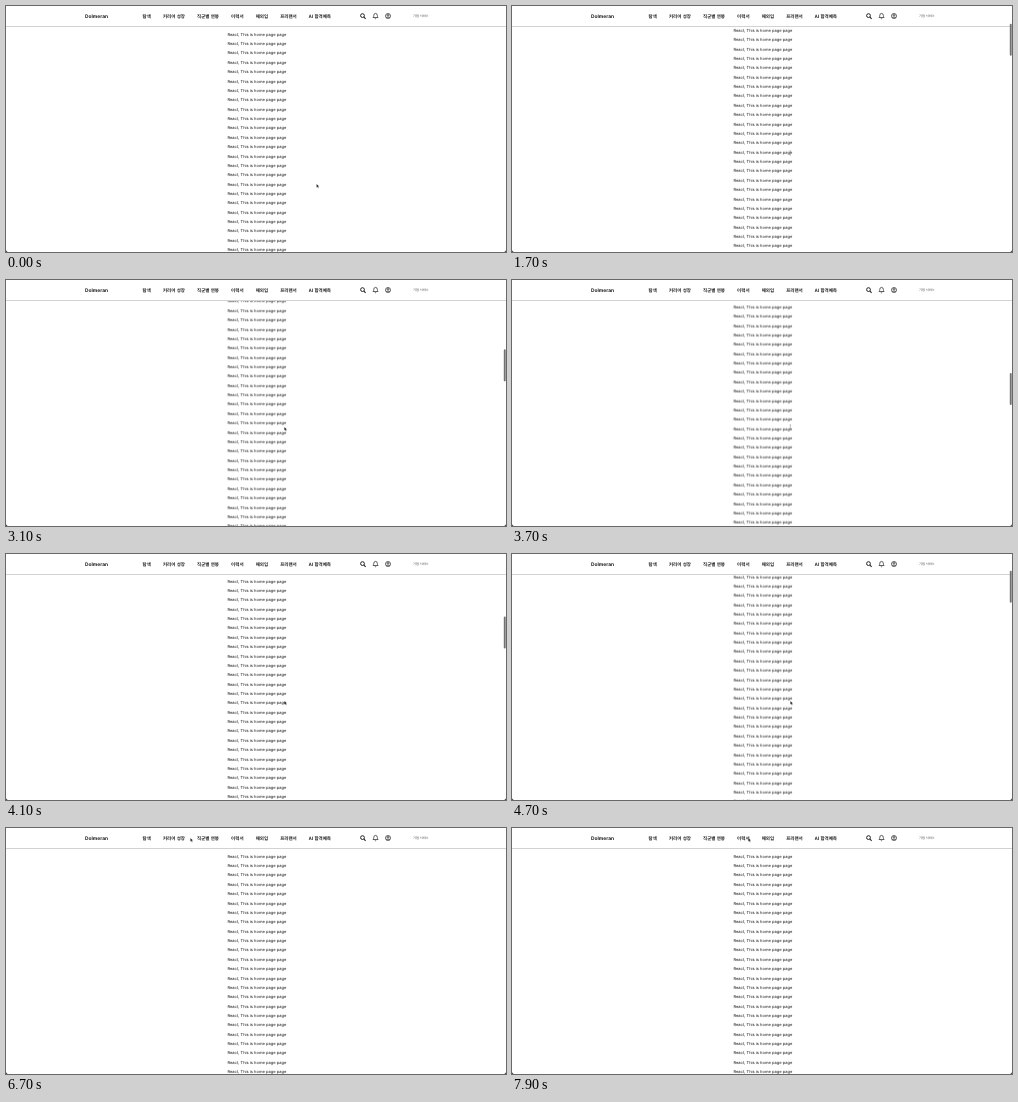
Write an HTML page that moves like this. It is 500 by 246 pixels and loops after 8 s.

```html
<!DOCTYPE html>
<html lang="ko">
<head>
<meta charset="utf-8">
<style>
html, body { margin: 0; width: 100%; height: 100%; overflow: hidden; background: #fff; }
svg { display: block; width: 500px; height: 246px; text-rendering: geometricPrecision; }
text { font-family: Inter, "Noto Sans CJK KR", "Noto Sans CJK", sans-serif; }
#lines { font-size: 4.05px; fill: #111; filter: blur(.25px); }
#nav { font: 700 4.5px "Noto Sans CJK KR", "Noto Sans CJK", sans-serif; }
#icons { fill: none; stroke: #222; stroke-width: .7; }
</style>
</head>
<body>
<svg viewBox="0 0 500 246">
  <g id="lines"></g>
  <rect width="500" height="20" fill="#fff"/>
  <rect y="20" width="500" height="1" fill="#d2d2d2"/>
  <!-- The slight rotation keeps baselines off the pixel grid -->
  <g fill="#1c1c1c" transform="rotate(.01)">
    <text x="79" y="11.9" font-size="4.9" font-weight="650">Dolmeran</text>
    <text id="nav" x="136.6" y="11.6"></text>
    <text x="407" y="11.1" font-size="3.2" fill="#444">기업 서비스</text>
  </g>
  <g id="icons">
    <path d="M358 11.2l1.6 1.6" stroke-width="1.1"/>
    <circle cx="356.5" cy="9.6" r="1.9" stroke-width="1"/>
    <path d="M367 11.5q.8-.7.8-2.2a1.75 1.9 0 0 1 3.5 0q0 1.5.8 2.2zM368.8 12.4q.7.7 1.4 0"/>
    <circle cx="382" cy="10" r="2.5"/>
    <circle cx="382" cy="9.3" r=".8"/>
    <path d="M380.3 11.8q1.7-1.7 3.4 0"/>
  </g>
  <rect id="thumb" x="497.8" width="1.9" height="32" rx=".9" fill="#727272"/>
  <path d="M0 244q0 2 2 2H0zM500 244q0 2-2 2h2z"/>
  <path id="arrow" d="M0 0v3.6l.9-.8.6 1.4.7-.3-.6-1.3h1.2z" fill="#111" stroke="#fff" stroke-width=".25"/>
  <path id="beam" d="M-.7-2.1h1.4M0-2.1v4.2M-.7 2.1h1.4" fill="none" stroke="#777" stroke-width=".45"/>
</svg>
<script>
const LOOP = 8000, STEP = 200, PITCH = 9.37, FIRST = 28.4, PAGE_RATIO = 7.68;
const $ = id => document.getElementById(id);

function add(parent, tag, attrs, content) {
  const node = document.createElementNS('http://www.w3.org/2000/svg', tag);
  for (const name in attrs) node.setAttribute(name, attrs[name]);
  node.textContent = content;
  parent.append(node);
}

['탐색', '커리어 성장', '직군별 연봉', '이력서', '해외입', '프리랜서', 'AI 합격예측']
  .forEach((label, i) => add($('nav'), 'tspan', { dx: i && 12.1 }, label));

for (let i = 0; i < 110; i++)
  add($('lines'), 'text', { x: 221.4, y: FIRST + 1.3 + i * PITCH }, 'React, This is home page page');

// Moves: start time, end time, values reached
const scrolls = [[1100, 2300, 270.3], [2300, 3100, 531.8], [3100, 3700, 713.5],
  [3700, 4700, 127.4], [4700, 5100, 0]];
const pointer = [[0, 100, 311.5, 167], [300, 900, 298, 153], [1100, 1300, 278.3, 147],
  [4900, 5500, 160.5, 64.5], [5500, 5900, 139, 10], [5900, 7100, 207, 10], [7100, 7900, 236.3, 10]];

function follow(from, moves, t) {
  return moves.reduce((pos, [start, end, ...to]) => {
    const u = Math.min(1, Math.max(0, (t - start) / (end - start)));
    return pos.map((v, i) => v + (to[i] - v) * u);
  }, from);
}

function place(id, x, y, shown) {
  $(id).setAttribute('transform', `translate(${x} ${y}) rotate(.01)`);
  $(id).style.display = shown ? '' : 'none';
}

function draw(now) {
  // The screen updates in discrete steps
  const t = Math.floor((now % LOOP + STEP / 2) / STEP) * STEP - STEP / 2;
  const [scroll] = follow([0], scrolls, t);
  const [x, y] = follow([310.5, 178], pointer, t);

  const rows = (y + scroll - FIRST) / PITCH;
  const gap = Math.abs(rows - Math.round(rows)) * PITCH;
  const overText = x > 221 && x < 280 && y > 21 && gap < 2;

  place('lines', 0, -scroll, true);
  place('thumb', 0, scroll / PAGE_RATIO, t >= 1300 && t < 5500);
  place('arrow', x, y, !overText);
  place('beam', x, y, overText);
}

const start = performance.now();
function tick() {
  draw(performance.now() - start);
  requestAnimationFrame(tick);
}
tick();
</script>
</body>
</html>
```
